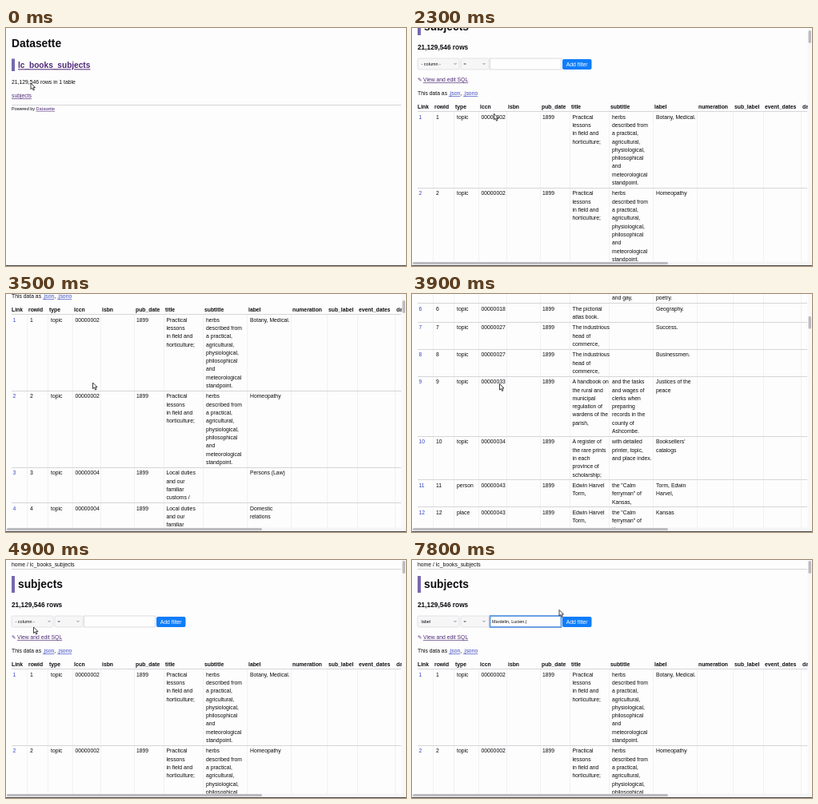
Recreate the animation shown at these times as an HTML page. Size 500 by 298 pixels, loop 8 s.

```html
<!DOCTYPE html>
<html lang="en">
<head>
<meta charset="utf-8">
<title>Browsing a table</title>
<style>
  html, body { margin: 0; width: 100%; height: 100%; overflow: hidden; background: #fdfdfd; }
  svg { display: block; width: 500px; height: 298px; }
  text { font: 6.8px "Liberation Sans", Arial, sans-serif; fill: #0c0c10; white-space: pre; }
  .b { font-weight: bold; }
  .u { text-decoration: underline; }
  .visited { fill: #4f2a78; }
  .link { fill: #3a48c0; }
  .button { fill: #fff; }
  .pencil { font-family: "DejaVu Sans", sans-serif; }
  .rule { stroke: #d6d6da; shape-rendering: crispEdges; }
  .col { stroke: #f1f1f4; shape-rendering: crispEdges; }
  .bar { fill: #7768ae; }
</style>
</head>
<body>
<svg viewBox="0 0 500 298" xmlns="http://www.w3.org/2000/svg">
  <rect width="500" height="298" fill="#fdfdfd"/>
  <g id="home"></g>
  <g id="table"><g id="page"></g><g id="bars"></g></g>
  <rect y="297" width="500" height="1" fill="#4a4a4e"/>
  <path id="cursor" d="M0 0V7.6L1.8 6 3.1 9 4.5 8.4 3.2 5.5H5.5Z" fill="#fdfdfd" stroke="#2c2c30" stroke-width=".9" stroke-linejoin="round"/>
</svg>
<script>
const LOOP = 8000, STEP = 100;
const LINE = 10.3, ROW_PAD = 3.1, FIRST_ROW = 143.3;
const QUERY = "Mardelin, Lucien.";
const $ = id => document.getElementById(id);

// y is the vertical middle of the lower-case letters and digits
const text = (x, y, s, cls = "", size = 6.8, attrs = "") =>
  `<text x="${x}" y="${y + size * 0.35}" class="${cls}" style="font-size:${size}px" ${attrs}>${s}</text>`;
const box = (x, y, w, h, attrs) => `<rect x="${x}" y="${y}" width="${w}" height="${h}" ${attrs}/>`;
const rule = y => `<path class="rule" d="M7 ${Math.floor(y) + 0.5}H494"/>`;
const chevron = x => `<path d="M${x} 76l1.5 1.6 1.5-1.6" fill="none" stroke="#707078" stroke-width=".8"/>`;

const columns = [[7, "Link"], [28, "rowid"], [54, "type"], [85, "lccn"], [120, "isbn"],
  [162, "pub_date"], [199, "title"], [248, "subtitle"], [303, "label"], [358, "numeration"],
  [403, "sub_label"], [441, "event_dates"], [488, "da"]];

const herbal = ["Practical|lessons|in field and|horticulture;",
  "herbs|described from|a practical,|agricultural,|physiological,|philosophical|and|meteorological|standpoint."];
const duties = "Local duties|and our|familiar|customs /";
const trade = "The industrious|head of|commerce,";
const memoir = ["Edwin Harvel|Torm,", "the \"Calm|ferryman\" of|Kansas,"];

// type, lccn, title, subtitle, label
const rows = [
  ["topic", 2, ...herbal, "Botany, Medical."],
  ["topic", 2, ...herbal, "Homeopathy"],
  ["topic", 4, duties, "", "Persons (Law)"],
  ["topic", 4, duties, "", "Domestic|relations"],
  ["topic", 12, "Rustic rhymes", "songs grave|and gay,", "American|poetry."],
  ["topic", 18, "The pictorial|atlas book.", "", "Geography."],
  ["topic", 27, trade, "", "Success."],
  ["topic", 27, trade, "", "Businessmen."],
  ["topic", 33, "A handbook on|the rural and|municipal|regulation of|wardens of the|parish,",
    "and the tasks|and wages of|clerks when|preparing|records in the|county of|Ashcombe.", "Justices of the|peace"],
  ["topic", 34, "A register of|the rare prints|in each|province of|scholarship;",
    "with detailed|printer, topic,|and place index.", "Booksellers'|catalogs"],
  ["person", 43, ...memoir, "Torm, Edwin|Harvel,"],
  ["place", 43, ...memoir, "Kansas"],
  ["topic", 43, ...memoir, "History"],
  ["topic", 51, "Lessons in|grammar", "", "Grammar"],
  ["topic", 51, "Lessons in|grammar", "", "Education"]
];

function tableRows() {
  let y = FIRST_ROW, out = "";
  rows.forEach(([type, lccn, ...long], i) => {
    const wrapped = long.map(s => s.split("|"));
    out += rule(y - 6.8) + text(8.5, y, i + 1, "link") + text(30, y, i + 1) + text(56, y, type) +
      text(86.5, y, String(lccn).padStart(8, "0")) + text(163, y, 1899);
    wrapped.forEach((lines, c) => lines.forEach((s, n) => {
      out += text([200.5, 250, 305][c], y + n * LINE, s);
    }));
    y += Math.max(...wrapped.map(lines => lines.length)) * LINE + ROW_PAD;
  });
  const dividers = columns.slice(1).map(([x]) => `M${x - 1.5} 137V${y - 7}`).join("");
  return `<path class="col" d="${dividers}"/>` + out + rule(y - 6.8);
}

$("home").innerHTML =
  text(7, 19.5, "Datasette", "b", 13.8) +
  box(7, 38.5, 4, 15.5, 'class="bar"') + text(15, 46.8, "lc_books_subjects", "b u visited", 10.1) +
  text(7, 67.7, "21,129,546 rows in 1 table") + text(7, 85, "subjects", "u visited") +
  rule(96.5) + text(7, 101, `Powered by <tspan class="u visited">Datasette</tspan>`, "", 5.5);

const control = 'rx="1.5" fill="#f6f6f7" stroke="#dcdce0" stroke-width=".8"';
$("page").innerHTML =
  text(7, 5.2, "home / lc_books_subjects", "", 6.85) + rule(11.5) +
  box(7, 20, 4, 21, 'class="bar"') + text(15, 30.5, "subjects", "b", 13.8) +
  text(7, 56.3, "21,129,546 rows", "b", 8.3) +
  box(7, 70, 52, 14, control) + text(11.5, 77, "", "", 5.5, 'id="choice"') + chevron(52.5) +
  box(61, 70, 35, 14, control) + text(64.5, 77, "=", "", 5.5) + chevron(88.5) +
  box(97.5, 70, 89, 14, 'id="field" fill="#fefefe"') + text(100, 77, "", "", 5.5, 'id="typed"') +
  box(188, 71, 36.5, 13, 'rx="2" fill="#0f7dfa"') +
  text(206.2, 77.8, "Add filter", "button", 6.8, 'text-anchor="middle"') +
  text(7, 97, "✎", "pencil visited", 6.5) + text(14, 97, "View and edit SQL", "u visited") +
  text(7, 114, `This data as <tspan class="u link">.json</tspan>, <tspan class="u link">.jsono</tspan>`) +
  columns.map(([x, name]) => text(x, 131, name, "b")).join("") + tableRows();

$("bars").innerHTML =
  box(494.5, 0, 5.5, 297, 'fill="#f8f8f9"') + box(0, 292.5, 500, 4.5, 'fill="#f6f6f7"') +
  box(495.5, 1, 3.5, 16, 'id="thumb" rx="1.7" fill="#bcbcc0"') +
  box(1, 293, 319, 3, 'rx="1.5" fill="#bcbcc0"');

// keys: [time, value, ...]
const pointer = [[0, 31, 69], [600, 21, 84], [1000, 21, 84], [1300, 121, 99], [1400, 123, 100],
  [1500, 123, 100], [1700, 108, 105], [1900, 104, 107], [2800, 100.5, 107.5], [3500, 108.5, 111],
  [3900, 109.5, 112.5], [4500, 109, 112], [4900, 34.5, 84], [5200, 33, 80], [5400, 33, 80],
  [5600, 33, 77], [6800, 33, 77], [7200, 140, 76], [7700, 184, 62.5]];
const scrolling = [[1800, 0], [2800, 63], [3500, 111], [3600, 150], [3900, 429], [4100, 490],
  [4300, 400], [4700, 0]];

function at(keys, t) {
  const next = keys.findIndex(k => k[0] > t);
  if (next < 0) return keys[keys.length - 1].slice(1);
  if (next === 0) return keys[0].slice(1);
  const a = keys[next - 1], b = keys[next], p = (t - a[0]) / (b[0] - a[0]);
  return a.slice(1).map((v, i) => v + (b[i + 1] - v) * p);
}

function draw(t) {
  $("home").style.display = t < 900 ? "" : "none";
  $("table").style.display = t < 1100 ? "none" : "";

  const scroll = Math.round(at(scrolling, t)[0]);
  $("page").setAttribute("transform", `translate(0 ${-scroll})`);
  $("thumb").setAttribute("y", 1 + scroll / 16);

  const focused = t >= 7200;
  const count = Math.max(0, Math.min(QUERY.length, Math.round((t - 7200) / 600 * QUERY.length)));
  $("choice").textContent = t < 6600 ? "- column -" : "label";
  $("typed").textContent = focused ? QUERY.slice(0, count) + "|" : "";
  $("field").setAttribute("stroke", focused ? "#5b96e0" : "#d3d3d8");
  $("field").setAttribute("stroke-width", focused ? 1.8 : 0.8);

  $("cursor").setAttribute("transform", `translate(${at(pointer, t)})`);
}

const start = performance.now();
function tick() {
  const t = (performance.now() - start) % LOOP;
  draw(Math.floor(t / STEP) * STEP);
  requestAnimationFrame(tick);
}
tick();
</script>
</body>
</html>
```
